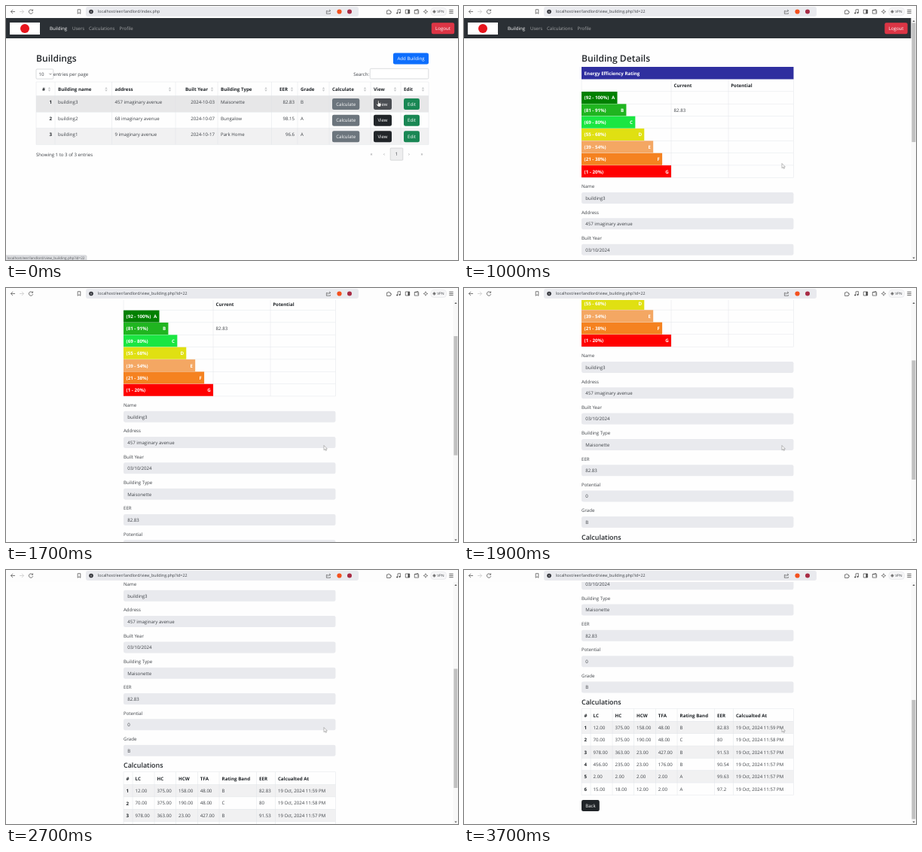
Animation of 600x338 px, one loop 3.8 s. Source, as an HTML page with a canvas:

```html
<!DOCTYPE html>
<html lang="en">
<head>
<meta charset="utf-8">
<title>Building details</title>
<style>
html, body { margin: 0; width: 100%; height: 100%; overflow: hidden; background: #fff; }
canvas { display: block; width: 600px; height: 338px; }
</style>
</head>
<body>
<canvas id="stage"></canvas>
<script>
const W = 600, H = 338, LOOP = 3800, STEP = 100;
const BAR = 16;             // browser toolbar height
const OPEN_AT = 300;        // the details page appears
const MAX_SCROLL = 305.5;
const INK = '#212529', SOFT = '#3d4146', LINE = '#dee2e6', BODY = 6.1;
const FAMILY = '"Open Sans", "Noto Sans", sans-serif';

const canvas = document.getElementById('stage');
const dpr = window.devicePixelRatio || 1;
canvas.width = W * dpr;
canvas.height = H * dpr;
const c = canvas.getContext('2d');
c.textRendering = 'geometricPrecision';

// y is the middle of the capitals
function text(s, x, y, { color = SOFT, size = BODY, weight = 400, align = 'left' } = {}) {
  c.font = `${weight} ${size}px ${FAMILY}`;
  c.fillStyle = color;
  c.textAlign = align;
  c.fillText(s, x, y + size * 0.345);
}

function bold(s, x, y, opts) {
  text(s, x, y, { weight: 700, size: 6.2, color: INK, ...opts });
}

function rect(x, y, w, h, color) {
  c.fillStyle = color;
  c.fillRect(x, y, w, h);
}

function box(x, y, w, h, r, fill, stroke) {
  c.beginPath();
  c.roundRect(x, y, w, h, r);
  if (fill) { c.fillStyle = fill; c.fill(); }
  if (stroke) { c.strokeStyle = stroke; c.lineWidth = 0.5; c.stroke(); }
}

function dot(x, y, r, color) {
  c.fillStyle = color;
  c.beginPath();
  c.arc(x, y, r, 0, 7);
  c.fill();
}

function path(d, x, y, { stroke = '#444', fill, width = 0.8 } = {}) {
  c.save();
  c.translate(x, y);
  const p = new Path2D(d);
  if (fill) { c.fillStyle = fill; c.fill(p); }
  if (stroke) { c.strokeStyle = stroke; c.lineWidth = width; c.stroke(p); }
  c.restore();
}

function button(label, x, y, w, color) {
  box(x, y, w, 15, 2.3, color);
  text(label, x + w / 2, y + 7.6, { color: '#fff', align: 'center' });
}

function grid(xs, ys) {
  const left = xs[0], right = xs[xs.length - 1];
  const top = ys[0], bottom = ys[ys.length - 1];
  for (const x of xs) rect(x - 0.2, top, 0.45, bottom - top, LINE);
  for (const y of ys) rect(left, y - 0.2, right - left, 0.45, LINE);
}

const steps = (from, pitch, n) => Array.from({ length: n }, (_, i) => from + i * pitch);

function ease(t, from, to) {
  const u = Math.min(1, Math.max(0, (t - from) / (to - from)));
  return u * u * (3 - 2 * u);
}

function toolbar(url) {
  rect(0, 0, W, BAR, '#fdfdfd');
  path('M3 0H-2.5M0 -2.6L-2.6 0L0 2.6', 9, 7.5, { width: 0.7 });
  path('M-3 0H2.5M0 -2.6L2.6 0L0 2.6', 21, 7.5, { stroke: '#c4c4c4', width: 0.7 });
  path('M2.2 -1.6A2.7 2.7 0 1 0 2.7 .7M2.6 -3V-1.2H.8', 33, 7.5, { width: 0.7 });
  path('M-1.8 -2.8H1.8V2.8L0 1.3L-1.8 2.8Z', 97, 7.5, { width: 0.7 });
  box(106, 1, 362, 13, 3, '#e9eaee');
  dot(113, 7.5, 2.8, '#303238');
  rect(112.65, 7, 0.7, 2, '#fff');
  rect(112.65, 5.8, 0.7, 0.7, '#fff');
  text(url, 122, 7.6, { size: 5.37 });
  path('M-.8 -1.2H-2.6V2.6H2.4V1.2M-1 1C-.8 -.8 .6 -1.4 2.6 -1.4M1.2 -2.9L2.8 -1.4L1.2 .1', 428, 7.7, { width: 0.6 });
  dot(442.5, 7.5, 3.1, '#f4511e');
  dot(456, 7.5, 3, '#a82c45');
  path('M-2.4 -1.4H-.9A.9 .9 0 1 1 .9 -1.4H2.2V0A.9 .9 0 1 1 2.2 1.6V3H-2.4Z', 508, 7.5, { width: 0.7 });
  path('M-1 2V-2.6L2.4 -3V1.5', 521, 7.5, { width: 0.7 });
  dot(519.2, 9.6, 1, '#444');
  dot(522.6, 9.1, 1, '#444');
  path('M-2.7 -2.5H2.7V2.5H-2.7Z', 533, 7.5, { width: 0.7 });
  rect(533.5, 5, 2.2, 5, '#444');
  path('M-2.7 -1.8H2.7V2.6H-2.7ZM-2.7 -1.8L1.8 -3V-1.8M.9 .4H2.7', 545, 7.5, { width: 0.7 });
  path('M0 -2.8L.8 -.8L2.8 0L.8 .8L0 2.8L-.8 .8L-2.8 0L-.8 -.8Z', 557, 7.5, { width: 0.6 });
  box(564, 2.5, 20.5, 10, 4, '#f7f7f8', '#dddee2');
  path('M-1.6 0A1.6 1.6 0 1 0 1.6 0A1.6 1.6 0 1 0 -1.6 0M0 -1.6V1.6M-1.6 0H1.6', 568.5, 7.5, { width: 0.6 });
  text('VPN', 572.2, 7.6, { size: 4.8 });
  path('M-2.7 -2.2H2.7M-2.7 0H2.7M-2.7 2.2H2.7', 591, 7.5);
}

function navbar(right) {
  rect(0, BAR, right, 27, '#2b3035');
  rect(5, 22, 40, 16, '#fff');
  dot(25, 30, 6, '#e8141c');
  text('Building', 58, 30.2, { color: '#fff' });
  const grey = { color: '#a2a4a6' };
  text('Users', 88, 30.2, grey);
  text('Calculations', 110, 30.2, grey);
  text('Profile', 150.5, 30.2, grey);
  button('Logout', right - 35.2, 22.2, 30.4, '#dc3545');
}

const heading = (s, x, y, size) => text(s, x, y, { size, weight: 600, color: INK });

function sortMark(x, y) {
  path('M-1.7 -.6L0 -2.9L1.7 -.6ZM-1.7 .6L0 2.9L1.7 .6Z', x, y, { stroke: null, fill: '#c4c6c8' });
}

const LIST_X = [40, 65, 140.5, 225, 281, 352.5, 387, 429, 484, 524, 561];
const LIST_HEAD = ['#', 'Building name', 'address', 'Built Year', 'Building Type', 'EER', 'Grade', 'Calculate', 'View', 'Edit'];
const LIST = [
  ['1', 'building3', '457 imaginary avenue', '2024-10-03', 'Maisonette', '82.83', 'B'],
  ['2', 'building2', '68 imaginary avenue', '2024-10-07', 'Bungalow', '98.15', 'A'],
  ['3', 'building1', '9 imaginary avenue', '2024-10-17', 'Park Home', '96.6', 'A'],
];
const NUMERIC = [0, 3, 5];

function listPage() {
  navbar(W);
  heading('Buildings', 40, 70.3, 12.1);
  button('Add Building', 514, 62.5, 47, '#0d6efd');

  box(40, 84, 22.8, 13, 1.2, '#fff', '#b5b8bc');
  text('10', 43.5, 90.5);
  path('M-1.5 -.8L0 .8L1.5 -.8', 59, 90.5, { width: 0.6 });
  text('entries per page', 62.8, 90.5);
  text('Search:', 482, 90.5, { align: 'right' });
  box(483.3, 83.3, 77.5, 13.6, 1.2, '#fff', '#b5b8bc');

  const rows = steps(119.5, 21.6, 4);
  rect(40, rows[0], 521, 21.6, '#e7e7e8');
  rect(40, rows[2], 521, 21.6, '#f1f1f2');
  grid(LIST_X, [101, ...rows]);

  LIST_HEAD.forEach((s, i) => {
    const end = LIST_X[i + 1];
    if (NUMERIC.includes(i)) bold(s, end - 13, 110.8, { align: 'right' });
    else bold(s, LIST_X[i] + 4, 110.8);
    sortMark(end - 7.5, 110.8);
  });

  LIST.forEach((row, r) => {
    const y = rows[r];
    row.forEach((s, i) => {
      const right = NUMERIC.includes(i);
      const write = i ? text : bold;
      write(s, right ? LIST_X[i + 1] - 4 : LIST_X[i] + 4, y + 8.6, { align: right ? 'right' : 'left' });
    });
    button('Calculate', 433, y + 3.6, 36.3, '#6c757d');
    button('View', 488, y + 3.6, 24, r ? INK : '#4a4d52');
    button('Edit', 528, y + 3.6, 21, '#198754');
  });

  text('Showing 1 to 3 of 3 entries', 40, 197.5);
  box(510.2, 189, 16.6, 16.2, 0.8, '#eeeeef', '#b9bbbd');
  text('1', 518.5, 197.3, { align: 'center' });
  [['«', 485], ['‹', 502], ['›', 535], ['»', 552]].forEach(([s, x]) =>
    text(s, x, 197.3, { align: 'center', color: '#8b8d90' }));

  box(-2, 331.8, 109, 8, 1.5, '#dcdde0', '#c3c5c8');
  text('localhost/eer/landlord/view_building.php?id=22', 1.5, 335.8, { size: 4.68, color: '#55585c' });
}

const BANDS = [
  ['(92 - 100%)', 'A', '#008000'],
  ['(81 - 91%)', 'B', '#20b520'],
  ['(69 - 80%)', 'C', '#1ae642'],
  ['(55 - 68%)', 'D', '#e0e012'],
  ['(39 - 54%)', 'E', '#f4a763'],
  ['(21 - 38%)', 'F', '#f58220'],
  ['(1 - 20%)', 'G', '#ff0000'],
];
const FIELDS = [
  ['Name', 'building3'], ['Address', '457 imaginary avenue'], ['Built Year', '03/10/2024'],
  ['Building Type', 'Maisonette'], ['EER', '82.83'], ['Potential', '0'], ['Grade', 'B'],
];
const CALC_X = [156, 168, 197, 225.5, 254.2, 283, 332.5, 357.3, 437.3];
const CALC_HEAD = ['#', 'LC', 'HC', 'HCW', 'TFA', 'Rating Band', 'EER', 'Calcualted At'];
const CALCS = [
  '12.00|375.00|158.00|48.00|B|82.83|11:59',
  '70.00|375.00|190.00|48.00|C|80|11:58',
  '978.00|363.00|23.00|427.00|B|91.53|11:57',
  '456.00|235.00|23.00|176.00|B|90.54|11:57',
  '2.00|2.00|2.00|2.00|A|99.63|11:57',
  '15.00|18.00|12.00|2.00|A|97.2|11:57',
];

function ratingTable() {
  const rows = steps(113.8, 16.35, 8);
  grid([156, 275, 351, 437.3], [97.4, ...rows]);
  rect(156, 81, 281.5, 16.4, '#2f2f9f');
  bold('Energy Efficiency Rating', 159.6, 89.5, { color: '#fff' });
  bold('Current', 278.6, 105.9);
  bold('Potential', 354.2, 105.9);
  BANDS.forEach(([range, grade, color], i) => {
    const y = rows[i], end = 203.5 + i * 11.92;
    rect(156, y + 0.2, end - 156, 16, color);
    bold(range, 159.6, y + 8.5, { color: '#fff' });
    bold(grade, end - 3.3, y + 8.5, { color: '#fff', align: 'right' });
  });
  text('82.83', 278.6, rows[1] + 8.5);
}

function calcTable() {
  const rows = steps(506.8, 16.35, 7);
  for (let i = 0; i < 6; i += 2) rect(156, rows[i], 281.3, 16.35, '#f1f1f2');
  grid(CALC_X, [490, ...rows]);
  CALC_HEAD.forEach((s, i) => bold(s, CALC_X[i] + 3.6, 499));
  CALCS.forEach((line, r) => {
    const y = rows[r] + 8.5, cells = line.split('|');
    cells[6] = `19 Oct, 2024 ${cells[6]} PM`;
    bold(String(r + 1), CALC_X[0] + 3.6, y);
    cells.forEach((s, i) => text(s, CALC_X[i + 1] + 3.6, y));
  });
}

function scrollbar(scroll) {
  const view = H - BAR, track = view - 13, full = view + MAX_SCROLL;
  rect(593.6, BAR, 6.4, view, '#f8f8f8');
  rect(594.4, BAR + 6.5 + scroll * track / full, 5, track * view / full, '#c1c1c1');
  path('M-1.6 .9L0 -.9L1.6 .9Z', 597, 20, { stroke: null, fill: '#555' });
  path('M-1.6 -.9L0 .9L1.6 -.9Z', 597, 335.5, { stroke: null, fill: '#555' });
}

function detailsPage(scroll) {
  c.save();
  c.translate(0, -scroll);
  navbar(593.6);
  heading('Building Details', 156, 70.3, 12.1);
  ratingTable();
  FIELDS.forEach(([label, value], i) => {
    const y = 240.2 + i * 34.33;
    text(label, 156, y);
    box(156, y + 7.8, 281.5, 15, 2.3, '#e9eaee');
    text(value, 161.2, y + 15.6);
  });
  heading('Calculations', 156, 481.6, 8.95);
  calcTable();
  button('Back', 156, 611.6, 23.8, INK);
  c.restore();
  scrollbar(scroll);
}

function scrollAt(t) {
  return 170.5 * ease(t, 1355, 2050) + (MAX_SCROLL - 170.5) * ease(t, 2400, 3120);
}

function pointer(t) {
  if (t < OPEN_AT) {
    path('M-.9 -4C-.9 -5 .5 -5 .5 -4V-1.6L3 -1C3.6 -.8 3.7 -.3 3.6 .3L3 3.6H-.6L-2.7 .8C-3.2 0 -2.3 -.6 -1.6 0L-.9 .6Z',
      494.5, 130.5, { fill: '#fff', stroke: '#222', width: 0.6 });
    return;
  }
  const k = ease(t, 620, 1000);
  path('M0 0V6.2L1.5 4.9L2.5 7L3.4 6.6L2.5 4.6H4.4Z', 494 - 72 * k, 126.5 + 83 * k,
    { fill: '#fff', stroke: '#777', width: 0.5 });
}

function draw(t) {
  c.setTransform(dpr, 0, 0, dpr, 0, 0);
  rect(0, 0, W, H, '#fefefe');
  const opened = t >= OPEN_AT;
  if (opened) detailsPage(scrollAt(t));
  else listPage();
  toolbar('localhost/eer/landlord/' + (opened ? 'view_building.php?id=22' : 'index.php'));
  pointer(t);
}

const start = performance.now();
function tick() {
  const t = (performance.now() - start) % LOOP;
  draw(Math.floor(t / STEP) * STEP);
  requestAnimationFrame(tick);
}
tick();
</script>
</body>
</html>
```
